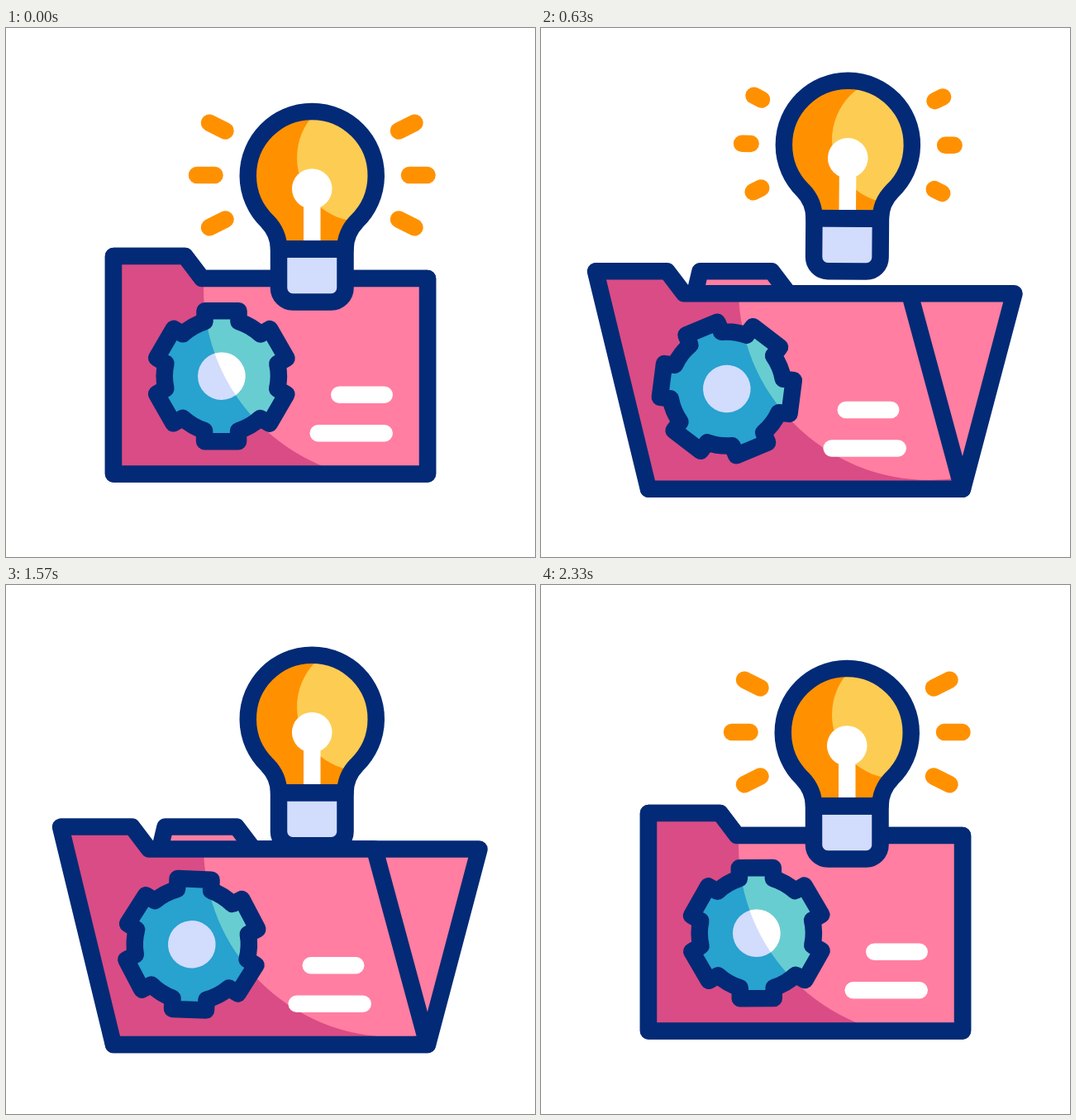
Recreate the animation shown at these times as an HTML page with a canvas. Size 640x640 px, loop 2.37 s.

```html
<!DOCTYPE html>
<html lang="en">
<head>
<meta charset="utf-8">
<title>Idea folder</title>
<style>
  html, body { margin: 0; height: 100%; overflow: hidden; background: #fff; }
  canvas { display: block; width: 640px; height: 640px; }
</style>
</head>
<body>
<canvas id="stage"></canvas>
<script>
const LOOP = 2370, STEP = 1000 / 30, LAST = 70;
const NAVY = '#032a76', ORANGE = '#ff9100', YELLOW = '#fdcc53', LILAC = '#d2dcfd', WHITE = '#fff';
const ROSE = '#da4c85', PINK = '#ff7ea1', BLUE = '#28a2ce', TEAL = '#68cdd1';
const LINE = 20.5;

const canvas = document.getElementById('stage');
const ctx = canvas.getContext('2d');
const dpr = window.devicePixelRatio || 1;
canvas.width = canvas.height = 640 * dpr;

// Timing helpers, in steps of 1/30 s
const clamp = u => Math.min(1, Math.max(0, u));
const smooth = u => u * u * (3 - 2 * u);
const ramp = (t, a, b) => smooth(clamp((t - a) / (b - a)));
const mix = (a, b, u) => a + (b - a) * u;

function keys(t, list) {
  let value = list[0][1];
  for (let i = 1; i < list.length; i++) {
    const [t0, v0] = list[i - 1], [t1, v1] = list[i];
    if (t >= t0) value = mix(v0, v1, ramp(t, t0, t1));
  }
  return value;
}

// Shapes
function disc(x, y, r) {
  const p = new Path2D();
  p.arc(x, y, r, 0, 2 * Math.PI);
  return p;
}

function folderPath(shift, dy) {
  const p = new Path2D();
  p.moveTo(130, 539.5 + dy);
  p.lineTo(130 + shift, 276 + dy);
  p.lineTo(216.5 + shift, 276 + dy);
  p.lineTo(237 + shift, 303 + dy);
  p.lineTo(510 + shift, 303 + dy);
  p.lineTo(510, 539.5 + dy);
  p.closePath();
  return p;
}

function gearPath() {
  const p = new Path2D();
  const tooth = [[-20.5, -66], [-20.5, -79], [20.5, -79], [20.5, -66]];
  const half = Math.atan2(20.5, 66);
  for (let i = 0; i < 6; i++) {
    const a = i * Math.PI / 3, c = Math.cos(a), s = Math.sin(a);
    for (const [x, y] of tooth) p.lineTo(x * c - y * s, x * s + y * c);
    const up = a - Math.PI / 2;
    p.arc(0, 0, 69.1, up + half, up + Math.PI / 3 - half);
  }
  p.closePath();
  return p;
}

const gear = gearPath();
const hub = disc(0, 0, 28.8);
const glass = new Path2D('M330 267.5C330 255 325 243 316.2 234A77.5 77.5 0 1 1 424.3 234C415.5 243 410.5 255 410.5 267.5Z');
const socket = new Path2D('M330 267.5V314.5a17 17 0 0 0 17 17h46.5a17 17 0 0 0 17-17V267.5Z');
const folderLight = disc(470, 316, 231);

// Left-hand rays, inner end to outer end; the right side mirrors them
const RAYS = [
  [265.5, 124.5, 246, 114.8],
  [252.5, 178, 231, 178],
  [265.5, 231.5, 246, 241.2]
];
// Grow from, grow to, shrink from, shrink to
const BURSTS = [[-2, -1, 0, 6], [14, 24, 33, 43], [48, 55, 50, 59], [60, 70, 80, 90]];
const SWEEPS = [[48, 55, 49, 59], [51, 60, 55, 65]];

// Drawing helpers
function stage() { ctx.setTransform(dpr, 0, 0, dpr, 0, 0); }

function outline(path) {
  ctx.strokeStyle = NAVY;
  ctx.lineWidth = LINE;
  ctx.stroke(path);
}

function fill(path, color) {
  ctx.fillStyle = color;
  ctx.fill(path);
}

// Fill a shape dark, then light where a disc fixed to the stage covers it
function twoTone(path, dark, light, area) {
  fill(path, dark);
  ctx.save();
  ctx.clip(path);
  stage();
  fill(area, light);
  ctx.restore();
}

function bar(x0, y0, x1, y1, color, width, from = 0, to = 1) {
  if (to - from < 0.002) return;
  ctx.strokeStyle = color;
  ctx.lineWidth = width;
  ctx.beginPath();
  ctx.moveTo(mix(x0, x1, from), mix(y0, y1, from));
  ctx.lineTo(mix(x0, x1, to), mix(y0, y1, to));
  ctx.stroke();
}

function trimmed(t, [a, b, c, d], x0, y0, x1, y1, width) {
  bar(x0, y0, x1, y1, ORANGE, width, ramp(t, c, d), ramp(t, a, b));
}

function drawFolder(t) {
  const open = keys(t, [[8, 0], [18, 1], [49, 1], [59, 0]]);
  const dy = keys(t, [[0, 0], [8, -18.5], [18, 18.3], [19, 18.3], [29, 0], [39, 0], [49, 18.3], [59, 0]]);

  const back = folderPath(62.5 * open, dy);
  fill(back, PINK);
  outline(back);

  const front = folderPath(-64 * open, dy);
  twoTone(front, ROSE, PINK, folderLight);
  outline(front);

  ctx.save();
  ctx.translate(260.8 - 36 * open, 421.2 + dy - 3 * open);
  ctx.rotate(t / LAST * 2 * Math.PI);
  twoTone(gear, BLUE, TEAL, folderLight);
  outline(gear);
  twoTone(hub, LILAC, WHITE, folderLight);
  ctx.restore();

  [[403.3, 443.7, 34.5], [377.7, 490.2, 26]].forEach(([x, y, slide], i) => {
    const dx = -slide * open, y1 = y + dy;
    bar(x + dx, y1, 457.7 + dx, y1, WHITE, LINE);
    trimmed(t, SWEEPS[i], x + dx, y1, 457.7 + dx, y1, 23);
  });
}

function drawBulb(t) {
  const rise = 1 - (1 - clamp((t - 15.3) / 10.3)) ** 2;
  const fall = clamp((t - 35.3) / 13.7) ** 2;
  const dy = -64 * (rise - fall);
  const tilt = keys(t, [[17, 0], [27, 4.5], [37, -4.5], [47, 0]]);

  ctx.save();
  ctx.translate(370.25, 325 + dy);
  ctx.rotate(tilt * Math.PI / 180);
  ctx.translate(-370.25, -325);

  for (const burst of BURSTS)
    for (const [x0, y0, x1, y1] of RAYS) {
      trimmed(t, burst, x0, y0, x1, y1, LINE);
      trimmed(t, burst, 740.5 - x0, y0, 740.5 - x1, y1, LINE);
    }

  twoTone(glass, ORANGE, YELLOW, disc(429, 157 + 0.58 * dy, 77));
  fill(disc(370.25, 194.5, 24.3), WHITE);
  ctx.fillRect(360, 194.5, 20.5, 68);
  fill(socket, LILAC);
  outline(socket);
  outline(glass);
  ctx.restore();
}

function draw(now) {
  const t = Math.min(LAST, (now % LOOP) / STEP);
  stage();
  ctx.fillStyle = WHITE;
  ctx.fillRect(0, 0, 640, 640);
  ctx.lineCap = ctx.lineJoin = 'round';
  drawFolder(t);
  drawBulb(t);
}

const start = performance.now();
function tick() {
  draw(performance.now() - start);
  requestAnimationFrame(tick);
}
tick();
</script>
</body>
</html>
```
